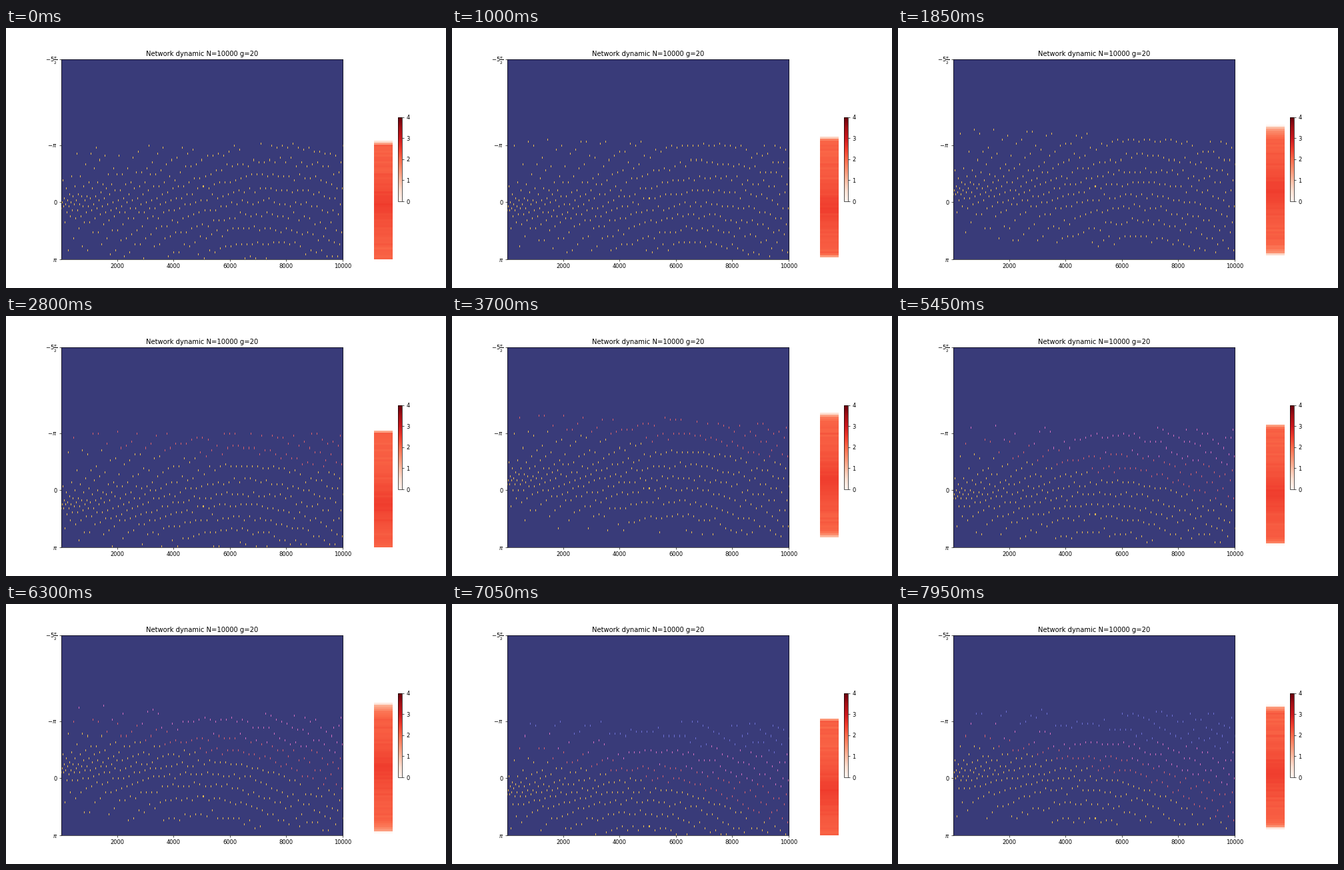
Recreate the animation shown at these times as a matplotlib script. Size 660 px wide and 390 px high, loop 8 s.

```python
import numpy as np
import matplotlib.pyplot as plt
from matplotlib.animation import FuncAnimation

W, H, DPI = 660, 390, 60
FRAMES, STEP = 160, 50
N, COLS, ROWS = 10000, 422, 100
MAIN = [0.125, 0.11, 0.64, 0.77]  # axes box in figure fractions
HEIGHT = MAIN[3] * H
BOTTOM = H - MAIN[1] * H
TOP = BOTTOM - HEIGHT
RAD = HEIGHT / (3.5 * np.pi)      # pixels per radian
LAP = 2 * np.pi * RAD
MID, SWING = 262, 20
WARMUP = 80                       # steps run before the loop starts
GOLDEN = (5 ** 0.5 - 1) / 2

BACK = "#393b79"
SHADES = ["#e7ba52", "#d6616b", "#ce6dbd", "#6b6ecf"]
CRESTS = [-4.8, -2.7, -0.6, 1.7, 3.92, 6.07, 8.38]   # seconds


def rgb(colour):
    return [int(colour[i:i + 2], 16) for i in (1, 3, 5)]


PALETTE = np.array([rgb(c) for c in SHADES], np.uint8)


def cycle(t):
    """Number of crests passed, with its fraction."""
    return np.interp(t, CRESTS, range(len(CRESTS)))


def shift(t):
    return -SWING * np.cos(2 * np.pi * cycle(t))


def squeeze(phase, q):
    """Slow the phase down around zero, keeping whole turns."""
    turns = np.round(phase / (2 * np.pi))
    rest = phase - 2 * np.pi * turns
    return 2 * np.pi * turns + 2 * np.arctan(q * np.tan(rest / 2))


def simulate():
    rng = np.random.default_rng(4)
    u = (np.arange(N) + 0.5) / N
    q = u ** 0.4
    speed = q * (8.4 + 17 * u) / RAD
    turn = u * COLS * GOLDEN + 2 * u ** 2 + rng.normal(0, 0.015, N)
    phase = 2 * np.pi * (turn % 1)

    wraps = np.full(N, -3)
    shade = np.zeros(N, int)
    rows, shades = [], []
    for k in range(-WARMUP, FRAMES):
        t = k * STEP / 1000
        theta = squeeze(phase + speed * t, q)
        y = MID + shift(t) + RAD * theta - LAP * wraps
        over = np.maximum(np.ceil((y - BOTTOM) / LAP), 0).astype(int)
        wraps += over
        y -= over * LAP
        # each wave of wraps takes the next shade
        shade[over > 0] = np.clip(int(cycle(t)) - 2, 0, 3)
        if k >= 0:
            row = ((y - TOP) / HEIGHT * ROWS).astype(int)
            rows.append(np.clip(row, 0, ROWS - 1))
            shades.append(shade.copy())
    return rows, shades


shown = ((np.arange(COLS) + 0.5) * N / COLS).astype(int)
rows, shades = simulate()


def raster(k):
    img = np.empty((ROWS, COLS, 3), np.uint8)
    img[:] = rgb(BACK)
    img[rows[k][shown], np.arange(COLS)] = PALETTE[shades[k][shown]]
    return img


def density(k):
    count = np.bincount(rows[k], minlength=ROWS).astype(float)
    count[count == 0] = np.nan
    return np.log10(count)[:, None]


fig = plt.figure(figsize=(W / DPI, H / DPI), dpi=DPI, facecolor="white")

ax = fig.add_axes(MAIN)
field = ax.imshow(raster(0), extent=(0, N, np.pi, -2.5 * np.pi),
                  aspect="auto", interpolation="nearest")
ax.set_title("Network dynamic N=10000 g=20")
ax.set_xticks(range(2000, N + 1, 2000))
ax.set_yticks([-2.5 * np.pi, -np.pi, 0, np.pi],
              [r"$-5\frac{\pi}{2}$", r"$-\pi$", "0", r"$\pi$"])

side = fig.add_axes([552 / W, MAIN[1], 28 / W, MAIN[3]])
side.axis("off")
bar = side.imshow(density(0), cmap="Reds", vmin=0, vmax=4,
                  aspect="auto", interpolation="nearest")
scale = 0.42 * MAIN[3]
cax = fig.add_axes([588 / W, MAIN[1] + (MAIN[3] - scale) / 2,
                    scale * H / 20 / W, scale])
fig.colorbar(bar, cax=cax, ticks=range(5))


def draw(k):
    field.set_data(raster(k))
    bar.set_data(density(k))
    return field, bar


anim = FuncAnimation(fig, draw, frames=FRAMES, interval=STEP,
                     repeat=True, repeat_delay=0, blit=False)
plt.show()
```
